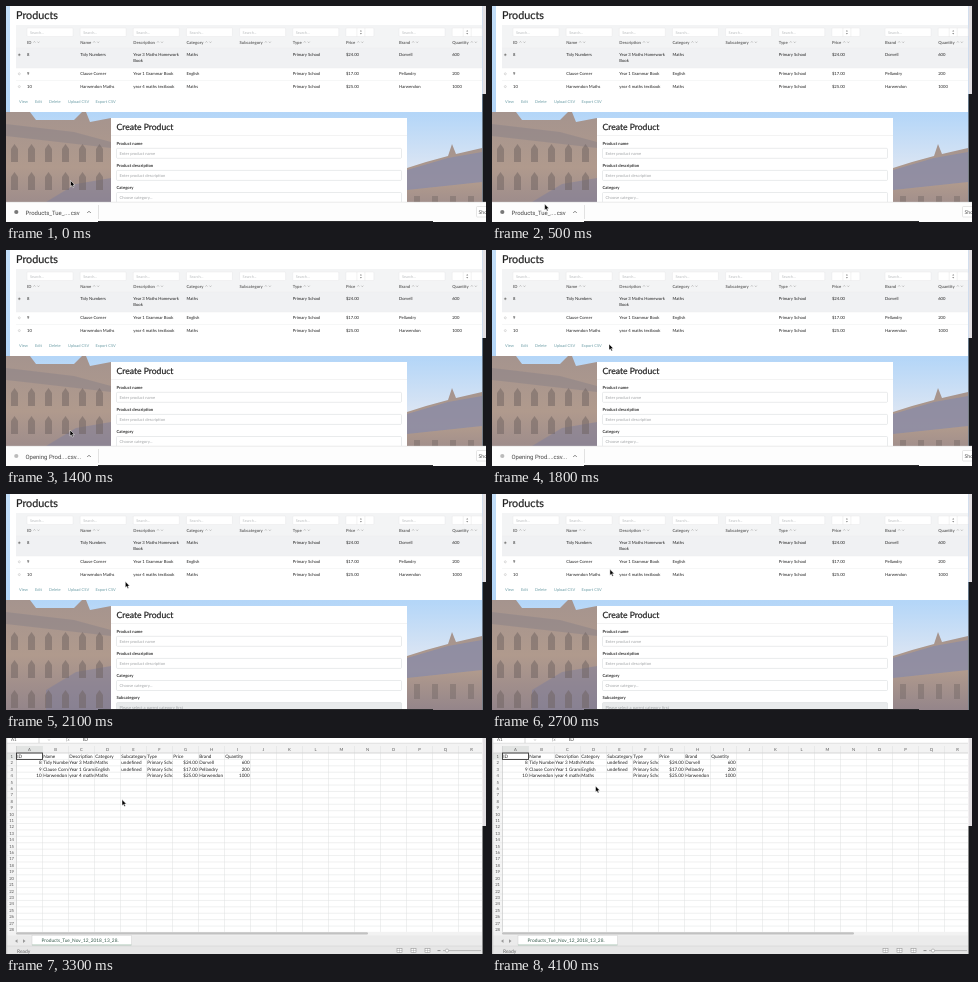
These frames come from a looping animation (480 by 216 pixels, 4200 ms). An HTML page:

```html
<!DOCTYPE html>
<html lang="en">
<head>
<meta charset="utf-8">
<title>CSV export</title>
<style>
  html, body { margin: 0; width: 100%; height: 100%; overflow: hidden; background: #fff; }
  svg { display: block; }
  #stage { width: 100vw; height: 100vh; }
  text { font-family: Lato, "Open Sans", sans-serif; text-rendering: geometricPrecision; white-space: pre; }
  .file { font-family: Roboto, sans-serif; }
  .title { stroke: #222; stroke-width: .22; }
</style>
</head>
<body>
<svg id="stage" viewBox="0 0 480 216" preserveAspectRatio="none">
  <defs>
    <linearGradient id="sky" x1="0" y1="0" x2="0" y2="1">
      <stop offset="0" stop-color="#c3def8"/>
      <stop offset=".5" stop-color="#b4d6f8"/>
      <stop offset=".75" stop-color="#dbe5f3"/>
    </linearGradient>
    <linearGradient id="stone" x1="0" y1="0" x2="0" y2="1">
      <stop offset="0" stop-color="#a5948e"/>
      <stop offset=".5" stop-color="#b09a8d"/>
      <stop offset="1" stop-color="#94858a"/>
    </linearGradient>
  </defs>
  <g id="page"></g>
  <g id="bar"></g>
  <g id="sheet"></g>
  <path id="cursor" d="M0 0V6.1L1.4 4.9 2.4 7.1 3.5 6.6 2.5 4.5H4.4Z" fill="#000" stroke="#fff" stroke-width=".5"/>
</svg>
<script>
const NS = 'http://www.w3.org/2000/svg';
const $ = id => document.getElementById(id);

function add(parent, tag, attrs) {
  const el = document.createElementNS(NS, tag);
  for (const k in attrs) el.setAttribute(k, attrs[k]);
  return parent.appendChild(el);
}
const rect = (p, x, y, width, height, fill, more) =>
  add(p, 'rect', { x, y, width, height, fill, ...more });
const line = (p, d, stroke, width = .5) =>
  add(p, 'path', { d, stroke, 'stroke-width': width, fill: 'none' });
function label(p, str, x, y, size, fill = '#333', more) {
  const el = add(p, 'text', { x, y, 'font-size': size, fill, ...more });
  el.textContent = str;
  return el;
}
const BOLD = { 'font-weight': 700 };
const TITLE = { class: 'title' };
const END = { 'text-anchor': 'end' };
const MID = { 'text-anchor': 'middle' };

const heads = ['ID', 'Name', 'Description', 'Category', 'Subcategory', 'Type', 'Price', 'Brand', 'Quantity'];
const books = [
  ['8', 'Tidy Numbers', 'Year 3 Maths Homework Book', 'Maths', '', 'Primary School', '$24.00', 'Dorvell', '600'],
  ['9', 'Clause Corner', 'Year 1 Grammar Book', 'English', '', 'Primary School', '$17.00', 'Pellandry', '200'],
  ['10', 'Harwendon Maths', 'year 4 maths textbook', 'Maths', '', 'Primary School', '$25.00', 'Harwendon', '1000']
];

function drawPhoto(p) {
  rect(p, 0, 0, 480, 216, 'url(#sky)');
  const shape = (d, fill, opacity = 1) => add(p, 'path', { d, fill, opacity });
  shape('M0 106H24L30 114H68L76 106H80L84 116 105 112V216H0Z', 'url(#stone)');
  shape('M401 162 420 156 442 150 446 138 450 148 476 142V216H401Z', 'url(#stone)');
  shape('M0 118 68 126 105 136V142L0 130Z', '#8a8288', .5);
  shape('M40 196 70 178 105 172V216H40Z', '#7f7f9c', .5);
  shape('M401 164 442 152 476 146V176L401 184Z', '#878bac', .7);
  // Window bays
  for (const y of [140, 168, 198])
    for (const x of [5, 22, 39, 56, 73, 90])
      shape(`M${x} ${y + 16}V${y + 3}L${x + 3.5} ${y - 2} ${x + 7} ${y + 3}V${y + 16}Z`, '#6d625f', .5);
  for (const x of [408, 426, 444, 462]) rect(p, x, 190, 6, 15, '#6d625f', { opacity: .4 });
}

function drawEdge(p) {
  rect(p, 476.5, 0, 3.5, 88, '#e3e0e3');
  rect(p, 476.5, 88, 3.5, 128, '#17181b');
}

function drawTable(p) {
  rect(p, 4, 0, 472, 106, '#fff');
  label(p, 'Products', 10, 13, 10.8, '#222', TITLE);
  rect(p, 10, 19, 466, 23, '#f3f4f5');
  rect(p, 10, 42, 466, 20, '#f0f1f3');
  line(p, 'M10 42H476M10 62H476M10 74.5H476', '#e8eaeb', .4);
  const colX = i => 21 + i * 53.15;
  heads.forEach((name, i) => {
    const x = colX(i), price = i === 6, last = i === 8;
    const w = price ? 28 : last ? 30 : 46;
    rect(p, x, 22, w, 8.5, '#fff', { stroke: '#e2e4e6', 'stroke-width': .4, rx: .8 });
    if (price || last) {
      const s = x + 15;
      line(p, `M${s - 4} 22V30.5M${s + 4} 22V30.5`, '#ddd', .4);
      add(p, 'path', { d: `M${s - 1} 25.6 ${s} 24 ${s + 1} 25.6ZM${s - 1} 26.9 ${s} 28.5 ${s + 1} 26.9Z`, fill: '#888' });
    } else label(p, 'Search...', x + 3, 27.8, 3.8, '#b9bcbe');
    const head = label(p, name, x, 37.6, 4.2, '#666', BOLD);
    const s = x + head.getComputedTextLength() + 3;
    line(p, `M${s - 1} 36.6 ${s} 35.4 ${s + 1} 36.6M${s + 3} 35.6 ${s + 4} 36.8 ${s + 5} 35.6`, '#999', .5);
  });
  books.forEach((row, r) => {
    const y = [50, 69, 81.8][r];
    add(p, 'circle', { cx: 13.3, cy: y - 1.2, r: 1, fill: r ? '#fff' : '#777', stroke: '#aaa', 'stroke-width': .4 });
    row.forEach((cell, i) => {
      const wrap = cell.endsWith(' Homework Book');
      label(p, wrap ? cell.slice(0, -5) : cell, colX(i), y, 4.2, '#222');
      if (wrap) label(p, 'Book', colX(i), y + 6, 4.2, '#222');
    });
  });
  const links = [['View', 13], ['Edit', 29], ['Delete', 43], ['Upload CSV', 62], ['Export CSV', 89.5]];
  links.forEach(([s, x]) => label(p, s, x, 97.3, 4, '#6f9fa8'));
}

function drawForm(p) {
  rect(p, 105, 112, 296, 104, '#fff');
  label(p, 'Create Product', 110.5, 124, 8.6, '#222', TITLE);
  line(p, 'M105 129.5H401', '#e6e6e6', .5);
  const fields = [
    ['Product name', 'Enter product name'],
    ['Product description', 'Enter product description'],
    ['Category', 'Choose category...'],
    ['Subcategory', 'Please select a parent category first']
  ];
  fields.forEach(([name, hint], i) => {
    const y = 139 + i * 22.1;
    label(p, name, 110.5, y, 4.2, '#333', BOLD);
    rect(p, 110.5, y + 3.3, 285, 10, i === 3 ? '#e9ebec' : '#fff', { stroke: '#d3d6d8', 'stroke-width': .5, rx: 1 });
    label(p, hint, 113.5, y + 9.8, 4.1, '#a3a6a8');
  });
}

function drawBar(p) {
  rect(p, 0, 196, 480, 20, '#fdfdfd');
  line(p, 'M0 196.2H480', '#d5d5d5');
  line(p, 'M92.5 199V213', '#d0d0d0', .6);
  const icon = add(p, 'circle', { cx: 10.3, cy: 206, r: 2.1, fill: '#777' });
  const name = label(p, '', 19.5, 208.6, 5.95, '#444', { class: 'file' });
  line(p, 'M81.2 207 83 205.2 84.8 207', '#666', .8);
  rect(p, 470.5, 200.5, 16, 10.5, '#fff', { stroke: '#ccc', 'stroke-width': .5, rx: 1 });
  label(p, 'Show All', 472.5, 207.8, 5.2, '#555');
  return { icon, name };
}

function drawSheet(p) {
  const colW = 26, rowH = 6.41, left = 10.5, top = 15;
  rect(p, 0, 0, 480, 216, '#fff');
  label(p, 'A1', 5, 2.6, 4.6, '#555');
  label(p, 'fx', 60, 2.6, 4.6, '#888', { 'font-style': 'italic' });
  label(p, 'ID', 77, 2.6, 4.8, '#333');
  line(p, 'M33 0V5M42 1.2 43 2.6 44 1.2', '#aaa');
  rect(p, 0, 5, 476, 10, '#f3f3f3');
  line(p, 'M0 5.2H476', '#c9c9c9');
  rect(p, 0, 15, left, 180, '#f5f5f5');
  rect(p, left, 8, colW, 7, '#e2e4e3');
  rect(p, 0, top, left, rowH, '#e2e4e3');

  let grid = '';
  for (let i = 0; i < 18; i++) {
    const x = left + i * colW;
    grid += `M${x} 8V194`;
    label(p, String.fromCharCode(65 + i), x + colW / 2, 13, 4.2, '#555', MID);
  }
  for (let r = 0; r < 28; r++) {
    const y = top + r * rowH;
    grid += `M1 ${y}H476`;
    label(p, r + 1, 5.6, y + 4.9, 4.2, '#555', MID);
  }
  line(p, grid, '#dcdedd', .45);
  line(p, 'M0 15H476M10.5 8V194', '#c4c4c4', .5);

  // Cells clip their text as the grid does
  const cell = (str, c, r, right) => {
    const box = add(p, 'svg', { x: left + c * colW, y: top + r * rowH, width: colW, height: rowH });
    label(box, str, right ? colW - .8 : .8, 4.9, 4.6, '#1c1c1c', right ? END : {});
  };
  heads.forEach((h, c) => cell(h, c, 0));
  books.forEach((row, r) => row.forEach((v, c) =>
    cell(c === 4 && r < 2 ? 'undefined' : v, c, r + 1, [0, 6, 8].includes(c))));
  rect(p, left, top, colW, rowH, 'none', { stroke: '#333', 'stroke-width': .9 });

  rect(p, 0, 193.8, 476, 3.4, '#f2f2f2');
  rect(p, 10, 194.2, 352, 2.3, '#c1c1c1', { rx: 1.1 });
  rect(p, 0, 197.2, 476, 10.8, '#ebebeb');
  add(p, 'path', { d: 'M11.5 201.2V205L9 203.1ZM17 201.2V205L19.5 203.1Z', fill: '#999' });
  rect(p, 26, 197.2, 99.5, 9.8, '#fff', { stroke: '#c8c8c8', 'stroke-width': .4 });
  line(p, 'M26 207H125.5', '#8fb9a0', .6);
  label(p, 'Products_Tue_Nov_12_2018_13_28.', 35.5, 204.3, 4.8, '#35594a');
  rect(p, 0, 208, 476, 8, '#e6e6e6');
  line(p, 'M0 208H476', '#cfcfcf');
  label(p, 'Ready', 11, 214.6, 4.9, '#666');
  for (const x of [391, 405, 419]) {
    rect(p, x, 210.3, 5, 4.4, '#fafafa', { stroke: '#888', 'stroke-width': .5 });
    line(p, `M${x} 212.5H${x + 5}M${x + 2.5} 210.3V214.7`, '#999', .4);
  }
  line(p, 'M431.5 212.6H434.5', '#777', .8);
  line(p, 'M437 212.6H475', '#aaa', .8);
  add(p, 'circle', { cx: 441, cy: 212.6, r: 1.6, fill: '#fff', stroke: '#888', 'stroke-width': .5 });
  rect(p, 0, 0, 1.2, 216, '#c8c8c8');
  drawEdge(p);
}

const page = $('page'), bar = $('bar'), sheet = $('sheet'), cursor = $('cursor');
const drawFoot = p => rect(p, 92, 215, 335, 1, '#2a2a2c');
drawPhoto(page);
drawTable(page);
drawForm(page);
drawEdge(page);
drawFoot(page);
const underline = line(page, 'M89.5 98.2H109.5', '#6f9fa8', .5);
const file = drawBar(bar);
drawFoot(bar);
drawSheet(sheet);

// Pointer tip: time, x, y
const path = [
  [0, 64.5, 174.5], [300, 58, 188], [600, 50, 203], [900, 47.5, 207], [1200, 47.5, 207],
  [1400, 64, 180], [1600, 100, 118], [1800, 117, 94], [2000, 117, 94], [2100, 119.3, 87.5],
  [2400, 119.3, 87.5], [3000, 116.5, 63], [3100, 116, 61.5], [4000, 116, 61.5], [4100, 103.5, 48]
];
function tipAt(t) {
  const i = path.findIndex(k => k[0] > t);
  if (i < 0) return path[path.length - 1].slice(1);
  const [t0, x0, y0] = path[i - 1], [t1, x1, y1] = path[i];
  const k = (t - t0) / (t1 - t0);
  return [x0 + (x1 - x0) * k, y0 + (y1 - y0) * k];
}

const LOOP = 4200, STEP = 100;
const show = (el, on) => { el.style.display = on ? '' : 'none'; };

function render(now) {
  const t = Math.floor((now % LOOP) / STEP) * STEP;
  const opening = t >= 1100;
  show(bar, t < 2100);
  show(sheet, t >= 3300);
  show(underline, t >= 700 && t < 1100);
  file.name.textContent = opening ? 'Opening Prod....csv...' : 'Products_Tue_....csv';
  file.icon.setAttribute('fill', opening ? '#bbb' : '#777');
  cursor.setAttribute('transform', `translate(${tipAt(t)})`);
}

const start = performance.now();
function tick() {
  render(performance.now() - start);
  requestAnimationFrame(tick);
}
tick();
</script>
</body>
</html>
```
